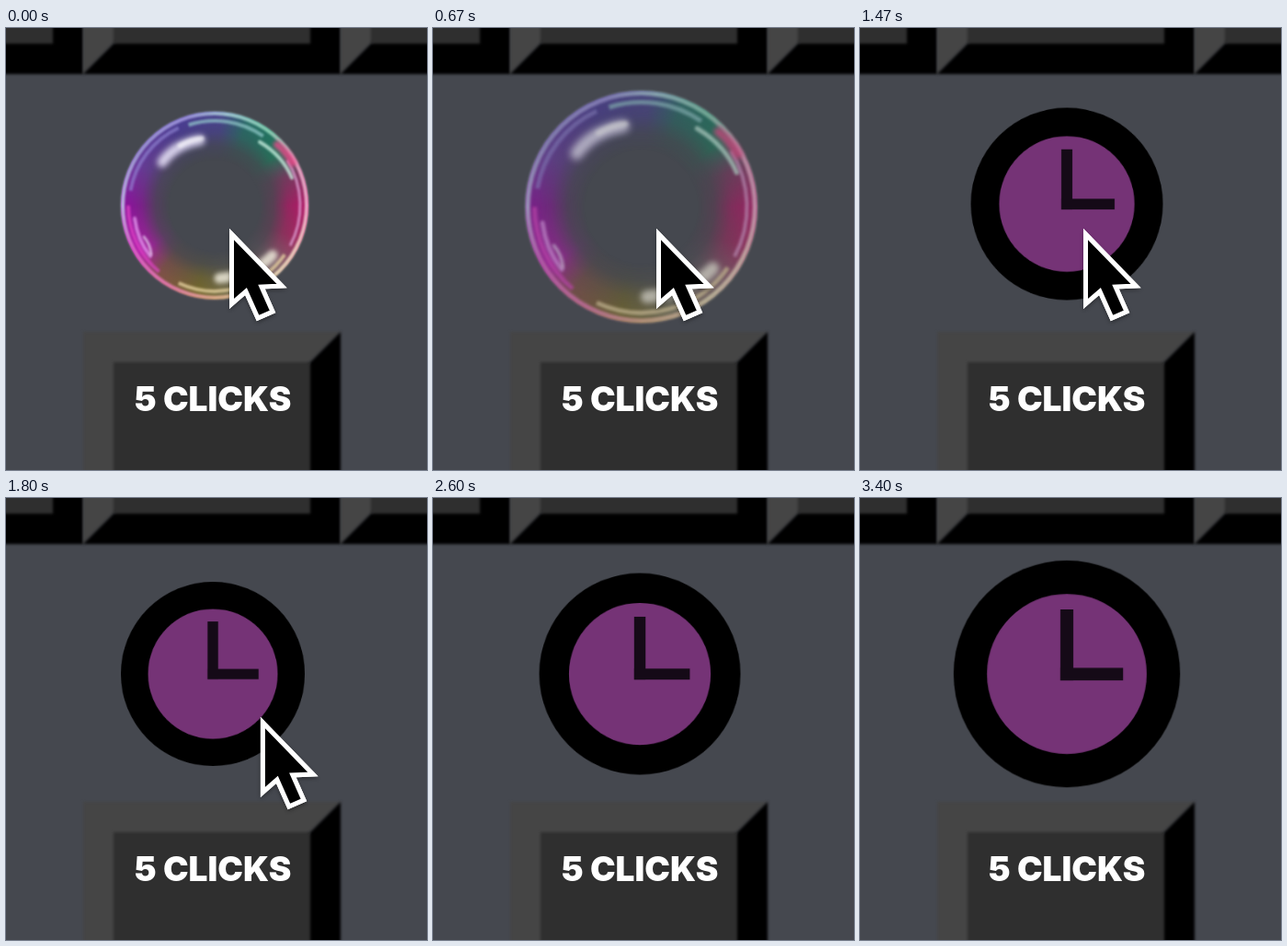
These frames come from a looping animation (458 px wide and 480 px high, 3.54 s). An HTML page with a canvas:

```html
<!DOCTYPE html>
<html lang="en">
<head>
<meta charset="utf-8">
<title>5 clicks</title>
<style>
  html, body { margin: 0; width: 100%; height: 100%; overflow: hidden; background: #45484f; }
  canvas { display: block; width: 458px; height: 480px; }
</style>
</head>
<body>
<canvas id="stage" width="458" height="480"></canvas>
<script>
const LOOP = 3540, STEP = 1000 / 15, LAST_STEP = 51;
const TAU = Math.PI * 2;
const ctx = document.getElementById('stage').getContext('2d');

const clamp = v => Math.max(0, Math.min(1, v));
const progress = (t, from, to) => clamp((t - from) / (to - from));
const mix = (a, b, p) => a + (b - a) * p;
const smooth = p => p * p * (3 - 2 * p);

function makeLayer(w, h, draw) {
  const layer = document.createElement('canvas');
  layer.width = w;
  layer.height = h;
  draw(layer.getContext('2d'));
  return layer;
}

function polygon(c, color, points) {
  c.fillStyle = color;
  c.beginPath();
  points.forEach(([x, y]) => c.lineTo(x, y));
  c.closePath();
  c.fill();
}

// A bevelled key: lit on the top and left, black on the right and bottom.
function drawKey(c, x, y, w, h) {
  const b = 33, right = x + w, bottom = y + h;
  c.filter = 'blur(1.4px)';
  polygon(c, '#454545', [[x, y], [right, y], [right - b, y + b], [x + b, bottom - b], [x, bottom]]);
  polygon(c, '#000', [[right, y], [right, bottom], [x, bottom], [x + b, bottom - b], [right - b, y + b]]);
  c.fillStyle = '#2f2f2f';
  c.fillRect(x + b, y + b, w - 2 * b, h - 2 * b);
  c.filter = 'none';
}

const background = makeLayer(458, 480, c => {
  c.fillStyle = '#45484f';
  c.fillRect(0, 0, 458, 480);
  for (const x of [-196, 84, 364]) drawKey(c, x, -230, 280, 280);
  drawKey(c, 84, 330, 280, 280);
  c.fillStyle = '#fff';
  c.font = '900 37px Inter, sans-serif';
  c.textAlign = 'center';
  c.fillText('5 CLICKS', 225, 415.5);
});

function sweep(c, stops) {
  const g = c.createConicGradient(0, 0, 0);
  stops.forEach(([at, color]) => g.addColorStop(at, color));
  return g;
}

function streak(c, color, width, blur, x1, y1, cx, cy, x2, y2) {
  c.filter = `blur(${blur}px)`;
  c.strokeStyle = color;
  c.lineWidth = width;
  c.lineCap = 'round';
  c.beginPath();
  c.moveTo(x1, y1);
  c.quadraticCurveTo(cx, cy, x2, y2);
  c.stroke();
  c.filter = 'none';
}

// A thin reflection following the bubble's edge, angles in degrees.
function edgeArc(c, color, radius, width, from, to) {
  c.filter = 'blur(1px)';
  c.strokeStyle = color;
  c.lineWidth = width;
  c.beginPath();
  c.arc(0, 0, radius, from * TAU / 360, to * TAU / 360);
  c.stroke();
  c.filter = 'none';
}

const BUBBLE_R = 102, BUBBLE_HALF = 110;
const bubble = makeLayer(BUBBLE_HALF * 2, BUBBLE_HALF * 2, c => {
  c.translate(BUBBLE_HALF, BUBBLE_HALF);
  c.fillStyle = sweep(c, [
    [0, '#b01a66'], [.06, '#a02a60'], [.12, '#80606a'], [.2, '#74705a'], [.28, '#74682c'],
    [.36, '#805048'], [.41, '#b01ca8'], [.5, '#8c149c'], [.58, '#683a9c'], [.68, '#4a3c92'],
    [.76, '#48428c'], [.81, '#276b66'], [.89, '#1f7a5c'], [.94, '#7c3860'], [1, '#b01a66']]);
  c.beginPath();
  c.arc(0, 0, BUBBLE_R, 0, TAU);
  c.fill();

  const fade = c.createRadialGradient(0, 0, 0, 0, 0, BUBBLE_R);
  [[.48, 0], [.63, .2], [.78, .74], [.9, .95], [1, 1]].forEach(
    ([at, alpha]) => fade.addColorStop(at, `rgba(0,0,0,${alpha})`));
  c.globalCompositeOperation = 'destination-in';
  c.fillStyle = fade;
  c.fillRect(-BUBBLE_HALF, -BUBBLE_HALF, BUBBLE_HALF * 2, BUBBLE_HALF * 2);
  c.globalCompositeOperation = 'source-over';

  c.filter = 'blur(.9px)';
  c.strokeStyle = sweep(c, [
    [0, '#eca6c8'], [.08, '#ecc8bc'], [.15, '#e2d6b0'], [.25, '#dcaa8a'], [.33, '#e078a8'],
    [.42, '#d860c4'], [.5, '#bcb4e2'], [.6, '#9a94d0'], [.7, '#9a90d8'], [.77, '#a2c8d2'],
    [.85, '#84ccb0'], [.91, '#dca0bc'], [1, '#eca6c8']]);
  c.lineWidth = 4;
  c.beginPath();
  c.arc(0, 0, 100, 0, TAU);
  c.stroke();
  c.filter = 'none';

  edgeArc(c, 'rgba(225,165,215,.75)', 93, 3, -32, 28);
  edgeArc(c, 'rgba(235,215,165,.75)', 93, 4, 35, 115);
  edgeArc(c, 'rgba(225,70,200,.7)', 94, 4, 130, 180);
  edgeArc(c, 'rgba(150,140,215,.6)', 93, 4, 190, 245);
  edgeArc(c, 'rgba(150,205,205,.7)', 92, 4, 252, 305);

  streak(c, 'rgba(240,235,255,.85)', 11, 3, -57, -47, -44, -66, -16, -71);
  streak(c, 'rgba(255,255,255,.6)', 5, 1.5, -38, -65, -26, -72, -14, -73);
  streak(c, 'rgba(245,242,225,.8)', 11, 2.5, 5, 79, 42, 76, 63, 54);
  streak(c, 'rgba(205,245,228,.75)', 4, 1.2, 49, -69, 74, -54, 84, -30);
  streak(c, 'rgba(245,70,140,.8)', 8, 2, 68, -66, 78, -58, 85, -46);
  streak(c, 'rgba(235,160,245,.7)', 4, 1, -87, 14, -84, 38, -70, 55);
  streak(c, 'rgba(240,220,250,.65)', 3, .8, -77, 34, -70, 42, -69, 53);
});

function drawBubble(x, y, radius, alpha) {
  const half = BUBBLE_HALF * radius / BUBBLE_R;
  ctx.globalAlpha = alpha;
  ctx.drawImage(bubble, x - half, y - half, half * 2, half * 2);
  ctx.globalAlpha = 1;
}

const clock = makeLayer(300, 300, c => {
  c.translate(150, 150);
  c.scale(125, 125);
  const disc = (r, color) => {
    c.fillStyle = color;
    c.beginPath();
    c.arc(0, 0, r, 0, TAU);
    c.fill();
  };
  disc(1, '#000');
  disc(.705, '#753376');
  c.fillStyle = '#150a17';
  c.fillRect(-.057, -.568, .114, .625);
  c.fillRect(-.057, -.053, .554, .11);
});

function drawClock(radius, alpha) {
  const half = 150 * radius / 125;
  ctx.globalAlpha = alpha;
  ctx.drawImage(clock, 225 - half, 191 - half, half * 2, half * 2);
  ctx.globalAlpha = 1;
}

function drawCursor(dx, dy) {
  const points = [[245.5, 224], [245.5, 299.5], [261, 286], [274, 315], [290, 308], [278, 281], [300, 280]];
  ctx.save();
  ctx.translate(dx, dy);
  ctx.shadowColor = 'rgba(0,0,0,.3)';
  ctx.shadowBlur = 4;
  ctx.shadowOffsetY = 2;
  polygon(ctx, '#000', points);
  ctx.lineWidth = 5;
  ctx.strokeStyle = '#fff';
  ctx.stroke();
  ctx.shadowColor = 'transparent';
  ctx.fill();
  ctx.stroke();
  ctx.restore();
}

function render(t) {
  ctx.drawImage(background, 0, 0);

  if (t < 590) {
    drawBubble(227, 192.7, 102 + t * .0128, 1);
  } else if (t < 990) {
    const burst = progress(t, 560, 960);
    drawBubble(mix(227, 225.5, burst), mix(192.7, 198.5, burst), mix(109, 173, burst), 1 - burst);
  }

  const clockAlpha = progress(t, 865, 1150);
  if (clockAlpha) drawClock(111.5 + 11.8 * Math.cos(Math.PI * (t - 3450) / 1530), clockAlpha);

  if (t < 2190) {
    const leave = smooth(progress(t, 1600, 2133));
    drawCursor(107 * leave, 63 * leave);
  }
}

function tick() {
  const ms = performance.now() % LOOP;
  render(Math.min(LAST_STEP, Math.floor((ms + 4) / STEP)) * STEP);
  requestAnimationFrame(tick);
}
tick();
</script>
</body>
</html>
```
